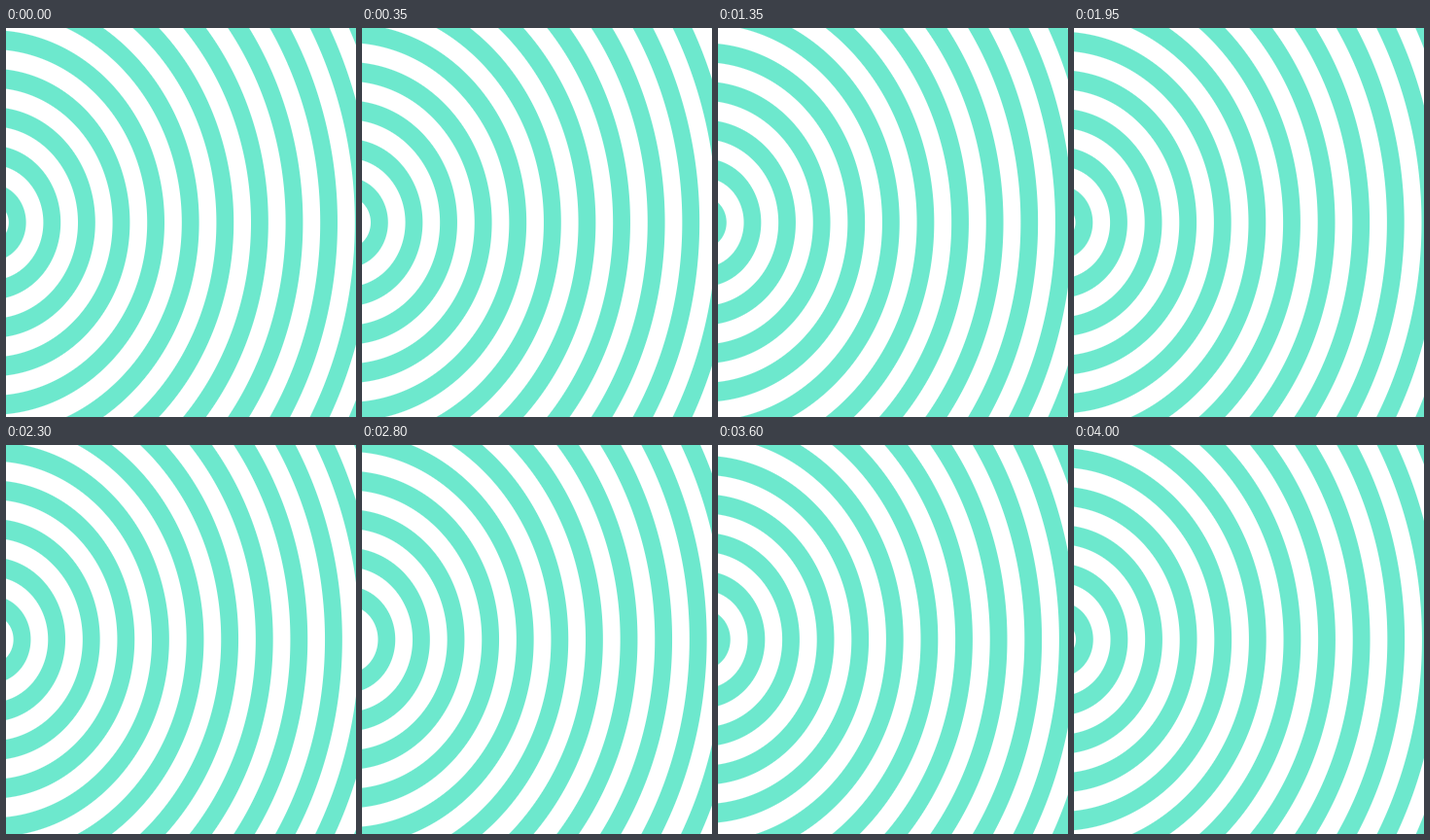
Recreate the animation shown at these times as an HTML page. Size 360 px wide and 400 px high, loop 4.05 s.

```html
<!DOCTYPE html>
<html lang="en">
<head>
<meta charset="utf-8">
<title>Rippling rings</title>
<style>
  @property --shift {
    syntax: "<length>";
    inherits: false;
    initial-value: 0px;
  }

  html, body {
    margin: 0;
    width: 100%;
    height: 100%;
    overflow: hidden;
    background: #fff;
  }

  /* Stops lie along the horizontal radius; half a pixel each side softens the edges. */
  .rings {
    --mint: #6de8cd;
    --band: 17.8px;
    width: 360px;
    height: 400px;
    background: repeating-radial-gradient(
      ellipse 360px 400px at -15px 200px,
      #fff calc(var(--shift) + 0.5px),
      #fff calc(var(--shift) + var(--band) - 0.5px),
      var(--mint) calc(var(--shift) + var(--band) + 0.5px),
      var(--mint) calc(var(--shift) + 2 * var(--band) - 0.5px),
      #fff calc(var(--shift) + 2 * var(--band) + 0.5px)
    );
    animation: ripple 4050ms steps(81, end) infinite;
  }

  /* Two full ring periods per loop */
  @keyframes ripple {
    from { --shift: 0px; }
    to { --shift: 71.2px; }
  }
</style>
</head>
<body>
<div class="rings"></div>
</body>
</html>
```
